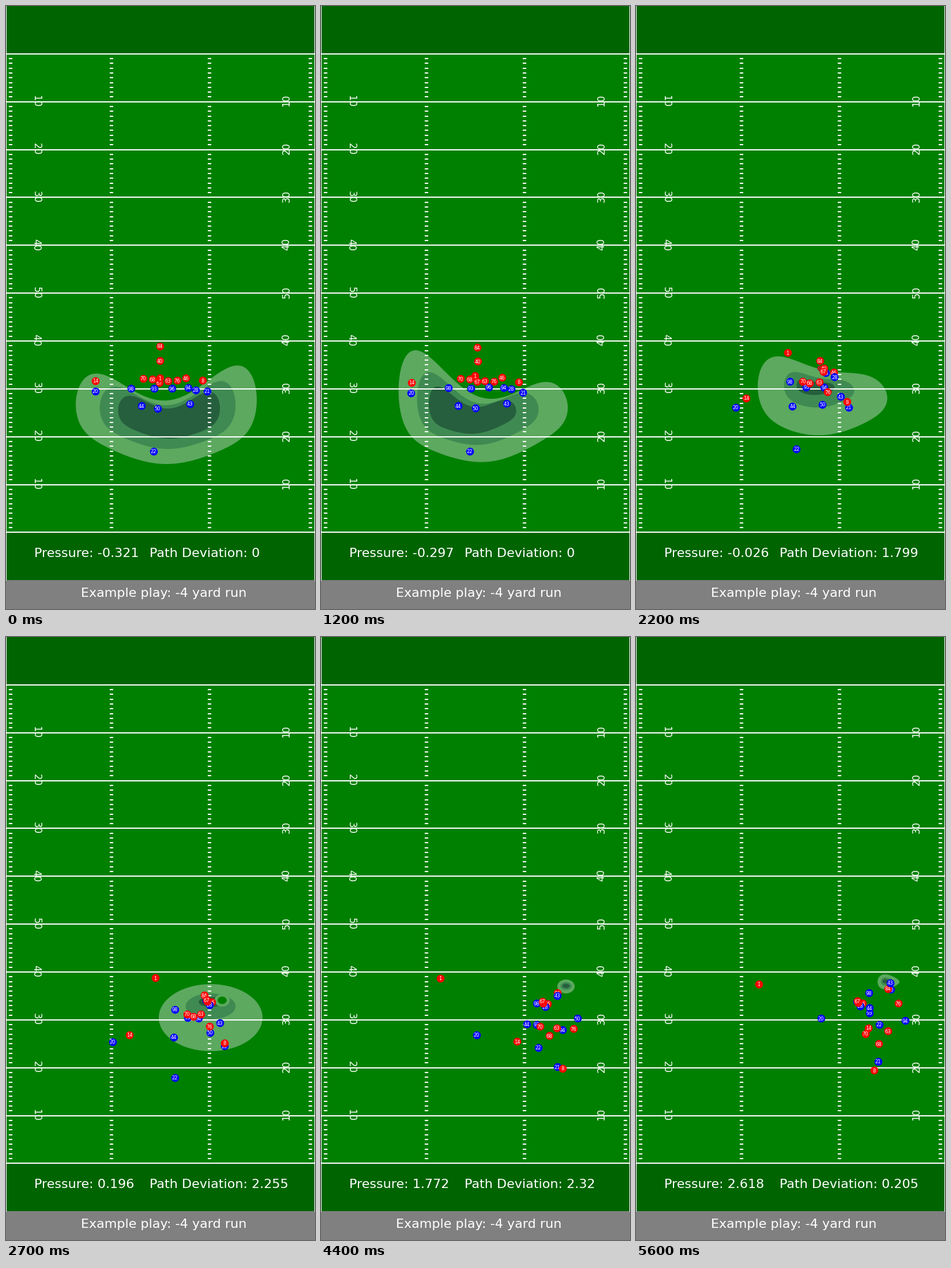
Write a matplotlib script that moves like this. It is 536 px wide and 1044 px high and loops after 5700 ms.

```python
import numpy as np
import matplotlib.pyplot as plt
from matplotlib.animation import FuncAnimation
from matplotlib.patches import Ellipse, Polygon, Rectangle

W, H, DPI = 536, 1044, 100
FRAMES, STEP = 57, 100
PX = 72 / DPI
YARD_X, YARD_Y = W / 53.3, H / 126
TURF, END_ZONE, GREY = "#008000", "#006400", "#808080"
RED, BLUE, BROWN = "#ff0000", "#0000ff", "#a52a2a"
SHADES = ["#5ca95f", "#3f8a52", "#265f3d"]

plt.rcParams["font.family"] = "DejaVu Sans"
fig = plt.figure(figsize=(W / DPI, H / DPI), dpi=DPI, facecolor="white")
ax = fig.add_axes([0, 0, 1, 1])
ax.set_xlim(0, W)
ax.set_ylim(H, 0)
ax.axis("off")


def ease(keys, values, t):
    """Monotone cubic through the keys, starting from rest."""
    keys, v = np.asarray(keys, float), np.asarray(values, float)
    t = np.clip(t, keys[0], keys[-1])
    i = min(np.searchsorted(keys, t, "right") - 1, len(keys) - 2)
    slope = [(v[k + 1] - v[k]) / (keys[k + 1] - keys[k]) for k in range(len(v) - 1)]

    def tangent(k):
        if k == 0:
            return 0 * v[0]
        if k == len(slope):
            return slope[-1]
        a, b = slope[k - 1], slope[k]
        same = a * b > 0
        return np.where(same, 2 * a * b / np.where(same, a + b, 1), 0)

    h = keys[i + 1] - keys[i]
    u = (t - keys[i]) / h
    s = u * u * (3 - 2 * u)
    return (v[i] + s * (v[i + 1] - v[i])
            + h * u * (1 - u) * ((1 - u) * tangent(i) - u * tangent(i + 1)))


# Field, measured in yards from the lower goal line
def yard(k):
    return H - (16 + k) * YARD_Y


def band(low, high, color):
    ax.add_patch(Rectangle((0, yard(high)), W, yard(low) - yard(high),
                           color=color, lw=0, zorder=0))


def chalk(x, y):
    ax.plot(x, y, color="white", lw=1.5, zorder=3)


band(-10, 110, END_ZONE)
band(0, 100, TURF)
band(-16, -10, GREY)
chalk([0, 0], [0, yard(-10)])
chalk([W, W], [0, yard(-10)])

for k in range(101):
    y = yard(k)
    if k % 10:
        for x in (0.8, 18.15, 35.15, 52.5):
            chalk([x * YARD_X - 2, x * YARD_X + 2], [y, y])
        continue
    chalk([0, W], [y, y])
    if 0 < k < 100:
        for x, dy, turn in ((52.5, -1, 270), (486.5, -2, 90)):
            ax.text(x, y + dy, min(k, 100 - k), color="white", size=12,
                    rotation=turn, ha="center", va="center", zorder=3)

# Influence zone: an ellipse bent upwards, its lobes flaring with the bend
TIMES = [0, 800, 1600, 2700, 3500, 4400, 5600]
ZONE = dict(
    cx=[278, 277, 291, 355, 388, 425, 438],
    cy=[738, 738, 725, 659, 653, 605, 597],
    width=[157, 155, 133, 90, 27, 15, 19],
    depth=[55, 56, 55, 58, 8, 12, 12],
    bend=[52, 56, 46, 0, 12, 0, 0],
    tilt=[-4, 6, 20, 0, -6, 0, 0],
    lean=[-0.08, 0.1, 0.5, 0, -0.3, 0, 0.4],
    shrink=[0.75, 0.75, 0.66, 0.48, 0.67, 0.64, 0.62],
)
ANGLE = np.linspace(0, 2 * np.pi, 160)


def zone_outline(level, cx, cy, width, depth, bend, tilt, lean, shrink):
    size = shrink**level
    flat = size**1.3
    u = np.cos(ANGLE)
    thick = (1 + 1.4 * bend / depth * u**2) * (1 - lean * u)
    x = cx + width * (size * u - 0.19 * lean * level)
    y = (cy - 0.0095 * depth**2 * (1 - flat)
         + flat * (depth * np.sin(ANGLE) * thick + tilt * u
                   - bend * (1 - (1 - u**2)**2.4)))
    return np.column_stack([x, y])


zones = [ax.add_patch(Polygon(np.zeros((3, 2)), color=c, lw=0, zorder=1))
         for c in SHADES]
gaps = [ax.add_patch(Ellipse((375, 629), 0, 0, color=c, lw=0, zorder=2))
        for c in (SHADES[0], TURF)]

# Players: set position, then a point at each later stage of the play
STAGES = [900, 2700, 4400, 5600]
actors = []


def player(label, color, *points, size=13.6):
    z = 4 + 0.1 * len(actors)
    dot, = ax.plot([], [], "o", color=color, ms=size * PX, mew=0, zorder=z)
    tag = ax.text(0, 0, label, color="white", size=6, ha="center",
                  va="center_baseline", zorder=z + 0.05)
    actors.append((dot, tag, points))


def follow(leader, dx=0, dy=0):
    return [(x + dx, y + dy) for x, y in leader]


carrier = [(344, 620), (410, 616), (437, 609)]
pile = [(349, 631), (385, 634), (385, 633)]

player("", BROWN, (267, 650), *follow(carrier), size=10)
player(22, BLUE, (256, 771), (293, 763), (377, 711), (422, 671))
player(20, BLUE, (155, 667), (185, 701), (270, 689), (321, 660))
player(21, BLUE, (349, 667), (379, 708), (410, 744), (420, 735))
player(96, BLUE, (288, 662), *follow(pile, -2, -2))
player(93, BLUE, (257, 662), (315, 659), (374, 671), (405, 651))
player(94, BLUE, (316, 661), (334, 660), (419, 680), (467, 664))
player(98, BLUE, (217, 662), (293, 645), (374, 634), (404, 616))
player(44, BLUE, (235, 692), (291, 693), (357, 670), (405, 642))
player(50, BLUE, (263, 697), (354, 685), (445, 660), (442, 610))
player(46, RED, (312, 644), *follow(pile, 8, 1))
player(84, RED, (267, 589), *carrier)
player(28, BLUE, (329, 665), *follow(pile, 4, 6))
player(40, RED, (267, 614), *pile)
player(43, BLUE, (319, 689), (371, 668), (410, 621), (441, 599))
player(67, RED, (266, 652), *follow(pile, -1, -3))
player(1, RED, (267, 644), (259, 590), (207, 591), (213, 601))
player(14, RED, (155, 649), (214, 689), (340, 700), (403, 677))
player(70, RED, (238, 645), (314, 653), (380, 674), (398, 687))
player(68, RED, (254, 646), (325, 657), (396, 690), (421, 704))
player(63, RED, (281, 649), (338, 653), (409, 677), (437, 682))
player(76, RED, (297, 648), (353, 674), (438, 678), (455, 634))
player(8, RED, (341, 648), (379, 703), (419, 747), (413, 750))

# Captions
PRESSURE = [-0.321, -0.275, -0.319, 0.196, -0.9, 1.772, 2.618]
DEVIATION = [1.2, 1.2, 1.2, 2.255, 1.413, 2.32, 0.205]
HANDOFF = 1700


def caption(x, y, text=""):
    return ax.text(x, y, text, color="white", size=16, va="baseline", zorder=9)


caption(130, 1023, "Example play: -4 yard run")
pressure = caption(49, 954)
deviation = caption(249, 954)


def reading(values, t):
    return round(float(ease(TIMES, values, t)), 3)


def draw(frame):
    t = frame * STEP
    now = {name: ease(TIMES, row, t) for name, row in ZONE.items()}
    for level, patch in enumerate(zones):
        patch.set_xy(zone_outline(level, **now))

    opening = max(0, 1 - abs(t - 2700) / 400)
    for gap, size in zip(gaps, (22, 13)):
        gap.set(width=1.2 * size * opening, height=size * opening,
                visible=opening > 0)

    for dot, tag, points in actors:
        x, y = ease(STAGES, points, t)
        dot.set_data([x], [y])
        tag.set_position((x, y))

    pressure.set_text(f"Pressure: {reading(PRESSURE, t)}")
    drift = reading(DEVIATION, t) if t >= HANDOFF else 0
    deviation.set_text(f"Path Deviation: {drift}")
    return []


anim = FuncAnimation(fig, draw, frames=FRAMES, interval=STEP, repeat=True,
                     repeat_delay=0, blit=False)
plt.show()
```
